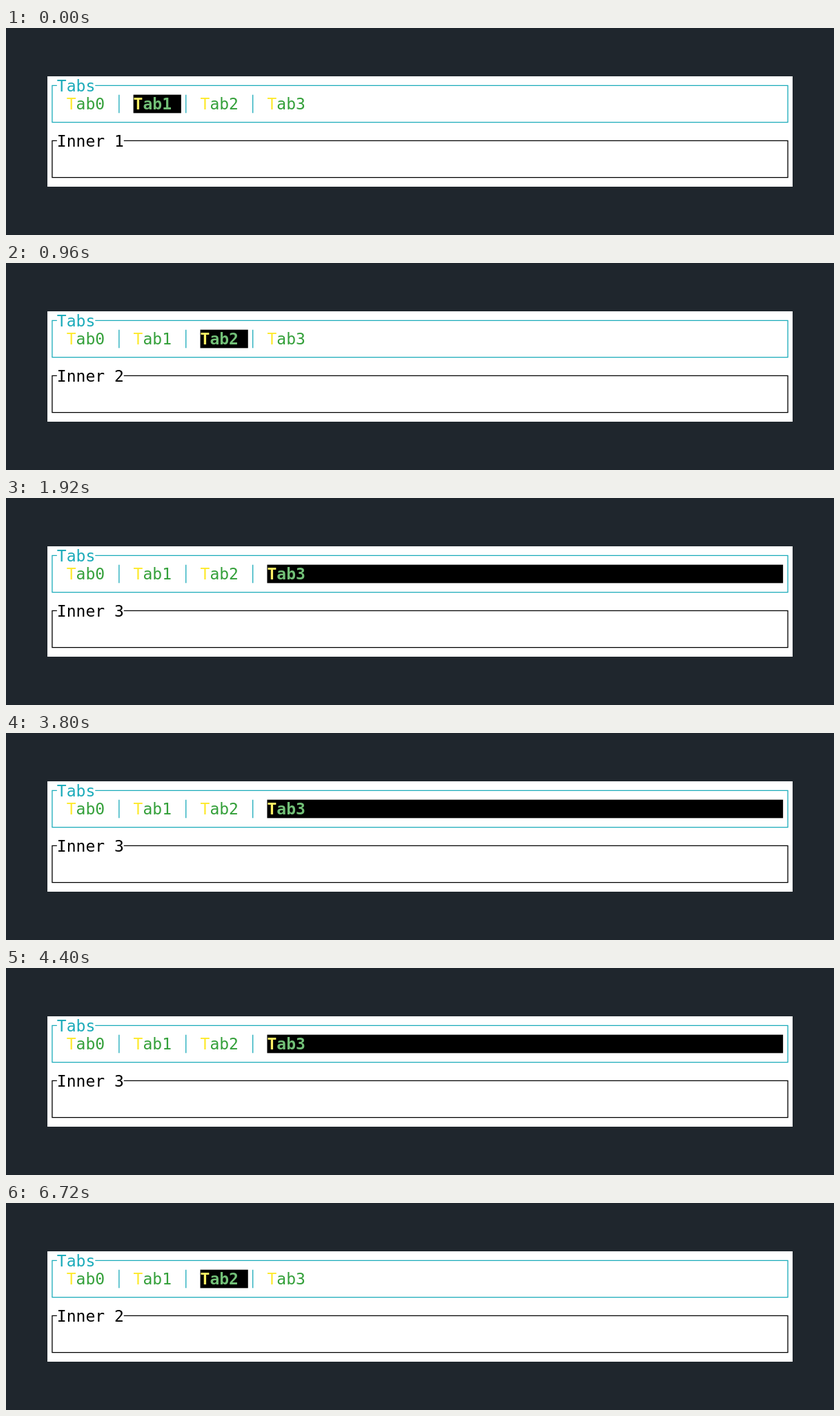
These frames come from a looping animation (1200x300 px, 8 s). An HTML page with a canvas:

```html
<!DOCTYPE html>
<html lang="en">
<head>
<meta charset="utf-8">
<title>Tabs</title>
<style>
html, body { margin: 0; height: 100%; overflow: hidden; background: #1f262d; }
canvas { display: block; }
</style>
</head>
<body>
<canvas width="1200" height="300"></canvas>
<script>
const ctx = document.querySelector('canvas').getContext('2d');
const LEFT = 60, TOP = 70, COLS = 78, ROWS = 6;
const CELL_W = 1080 / COLS, CELL_H = 160 / ROWS;
const CYAN = '#1babba', GREEN = '#34a03a', YELLOW = '#fdea30';
const LOOP = 8000;
// [start time in ms, selected tab]
const STEPS = [[0, 1], [960, 2], [1920, 3], [2880, 0], [3800, 3], [4800, 2]];

const x = col => LEFT + col * CELL_W;
const y = row => TOP + row * CELL_H;

function text(str, col, row, color, weight = 'normal') {
  ctx.font = `${weight} 23px "DejaVu Sans Mono", monospace`;
  ctx.fillStyle = color;
  ctx.fillText(str, x(col), y(row) + 21.6);
}

function line(color, ...points) {
  ctx.strokeStyle = color;
  ctx.lineWidth = 1.3;
  ctx.beginPath();
  for (const [col, row] of points) ctx.lineTo(x(col), y(row));
  ctx.stroke();
}

function box(title, row, color) {
  const top = row + 0.5, bottom = row + 2.5, right = COLS - 0.5;
  line(color, [1 + title.length, top], [right, top], [right, bottom],
    [0.5, bottom], [0.5, top], [1, top]);
  text(title, 1, row, color);
}

function tab(index, selected) {
  const col = 2 + index * 7, last = index === 3;
  if (selected) {
    const end = last ? COLS - 1 : col + 5;
    ctx.fillStyle = '#000';
    ctx.fillRect(x(col), y(1), x(end) - x(col), CELL_H);
  }
  const weight = selected ? 'bold' : 'normal';
  text('T', col, 1, selected ? '#fff263' : YELLOW, weight);
  text('ab' + index, col + 1, 1, selected ? '#72c077' : GREEN, weight);
  if (!last) line(CYAN, [col + 5.5, 1], [col + 5.5, 2]);
}

function draw(now) {
  const time = now % LOOP;
  const current = STEPS.findLast(([start]) => time >= start)[1];
  ctx.fillStyle = '#1f262d';
  ctx.fillRect(0, 0, 1200, 300);
  ctx.fillStyle = '#fff';
  ctx.fillRect(LEFT, TOP, 1080, 160);
  box('Tabs', 0, CYAN);
  for (let i = 0; i < 4; i++) tab(i, i === current);
  box('Inner ' + current, 3, '#000');
}

const start = performance.now();
function tick() {
  draw(performance.now() - start);
  requestAnimationFrame(tick);
}
tick();
</script>
</body>
</html>
```
